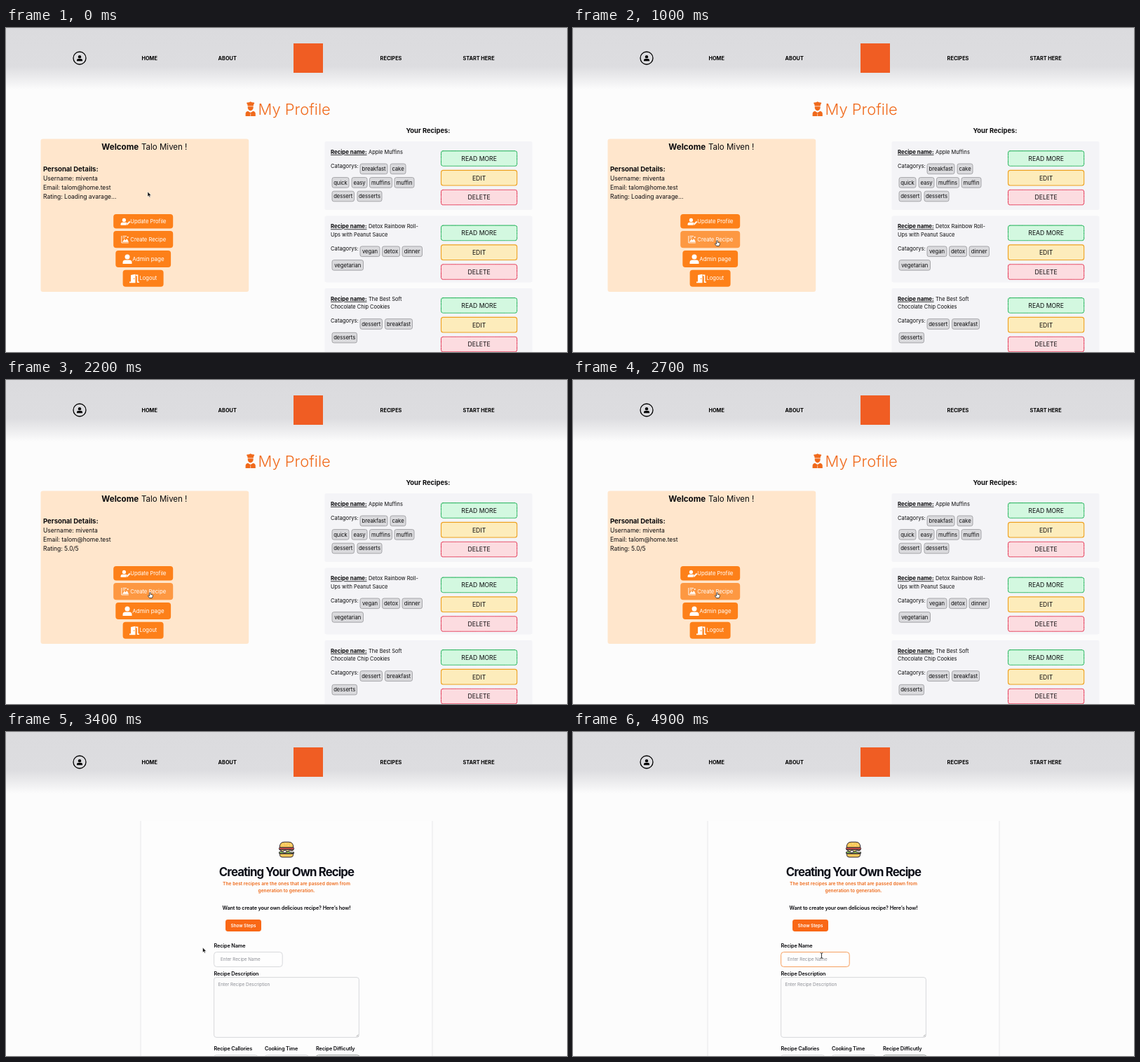
These frames come from a looping animation (800x463 px, 5000 ms). An HTML page:

```html
<!DOCTYPE html>
<html lang="en">
<head>
<meta charset="utf-8">
<title>Recipe profile</title>
<style>
  html, body { margin: 0; width: 100%; height: 100%; overflow: hidden; background: #fcfcfc; }
  svg { display: block; width: 800px; height: 463px; }
  text { font-family: Inter, "Open Sans", sans-serif; white-space: pre; }
</style>
</head>
<body>
<svg id="stage" viewBox="0 0 800 463" xmlns="http://www.w3.org/2000/svg"></svg>
<script>
const LOOP = 5000, STEP = 100;
const ORANGE = '#fd8019', HOVER = '#fd9842';

// Drawing helpers
const text = (x, y, s, size, o = {}) =>
  `<text x="${x}" y="${y}" font-size="${size}" font-weight="${o.w || 400}" fill="${o.fill || '#0b0b0d'}"` +
  ` text-anchor="${o.at || 'start'}" letter-spacing="${o.ls || 0}"${o.id ? ` id="${o.id}"` : ''}` +
  `${o.line ? ' text-decoration="underline"' : ''}>${s}</text>`;
const mid = (x, y, s, size, o = {}) => text(x, y, s, size, { ...o, at: 'middle' });
const box = (x, y, w, h, r, fill, extra = '') =>
  `<rect x="${x}" y="${y}" width="${w}" height="${h}" rx="${r}" fill="${fill}" ${extra}/>`;
const path = (d, fill, extra = '') => `<path d="${d}" fill="${fill}" ${extra}/>`;
const dot = (x, y, r, fill, extra = '') => `<circle cx="${x}" cy="${y}" r="${r}" fill="${fill}" ${extra}/>`;
const person = (x, y, k, fill) => `<g transform="translate(${x} ${y}) scale(${k})">` +
  dot(0, -3, 3.5, fill) + path('M-6.5 7V5Q-6.5 1.5-3 1.5H3Q6.5 1.5 6.5 5V7Z', fill) + '</g>';

function header() {
  const nav = [[204.7, 'HOME'], [315.7, 'ABOUT'], [549, 'RECIPES'], [674, 'START HERE']];
  return box(0, 0, 800, 88, 0, 'url(#fade)') +
    dot(105, 43, 9, 'none', 'stroke="#000" stroke-width="1.3"') + person(105, 43, .62, '#000') +
    nav.map(([x, s]) => mid(x, 45.7, s, 7.35, { w: 700, fill: '#000' })).join('') +
    box(410, 22, 42, 42, 0, '#f05d23');
}

function chef() {
  const c = '#f06a1c';
  return path('M344.7 111.4L344.2 109Q342.4 107.8 343.6 106.6Q346.2 106.8 348.7 105.2Q351.2 106.8 353.8 106.6Q355 107.8 353.2 109L352.7 111.4Z', c) +
    path('M344.8 112.2H352.6V114.2Q352 117.8 348.7 118.2Q345.4 117.8 344.8 114.2Z', c) +
    path('M341.6 126V122.4Q341.8 119.6 345 118.8L348.7 121L352.4 118.8Q355.6 119.6 355.8 122.4V126Z', c) +
    path('M348.7 122V126', 'none', 'stroke="#fcfcfc" stroke-width=".6"');
}

// Recipe cards
const actions = [
  ['READ MORE', '#d3f8e0', '#1cb054', '1.7 .4'], ['EDIT', '#fdecbb', '#eea11f', 'none'],
  ['DELETE', '#fcdce0', '#e32d4c', '1.7 .4']
];
const cards = [
  { y: 162, h: 98, top: 176, lines: ['Apple Muffins'], base: 199.7, tagY: 194,
    tags: [[505, 39, 0, 'breakfast'], [548, 22, 0, 'cake'], [465, 24, 1, 'quick'], [493, 22, 1, 'easy'],
           [518.5, 32, 1, 'muffins'], [554, 28, 1, 'muffin'], [465, 31.5, 2, 'dessert'], [501, 35, 2, 'desserts']] },
  { y: 268.5, h: 95, top: 282.5, lines: ['Detox Rainbow Roll-', 'Ups with Peanut Sauce'], base: 317.7, tagY: 312,
    tags: [[505, 28, 0, 'vegan'], [536.5, 25, 0, 'detox'], [565, 28.5, 0, 'dinner'], [465, 44.5, 1, 'vegetarian']] },
  { y: 372, h: 95, top: 386, lines: ['The Best Soft', 'Chocolate Chip Cookies'], base: 421.4, tagY: 415.7,
    tags: [[505, 31.5, 0, 'dessert'], [540.5, 39, 0, 'breakfast'], [465, 35.5, 1, 'desserts']] }
];

function card(c) {
  const tag = ([x, w, row, s]) => {
    const y = c.tagY + row * 19.6;
    return box(x, y, w, 14.6, 2.6, '#dadadd', 'stroke="#96969a" stroke-width=".8"') +
      mid(x + w / 2, y + 10, s, 7.65);
  };
  const action = ([s, fill, edge, dash], i) => {
    const y = c.top + i * 27.8;
    return box(620.5, y - .4, 108.2, 21.6, 3, fill, `stroke="${edge}" stroke-width="1.1" stroke-dasharray="${dash}"`) +
      mid(674.6, y + 13.7, s, 8.65);
  };
  return box(454.5, c.y, 296, c.h, 2, '#f4f4f7') +
    text(463, c.top + 3.9, 'Recipe name:', 7.8, { w: 700, line: true }) +
    text(517, c.top + 3.9, c.lines[0], 7.45) +
    (c.lines[1] ? text(463, c.top + 15, c.lines[1], 7.45) : '') +
    text(463, c.base, 'Catagorys:', 7.7) +
    c.tags.map(tag).join('') + actions.map(action).join('');
}

function button(id, x, y, w, h, tx, s, size) {
  return box(x, y, w, h, 4, ORANGE, `id="${id}"`) + text(tx, y + h / 2 + 2.5, s, size, { fill: '#fff' });
}

function profile() {
  const white = '#fff';
  return chef() + text(359.5, 124, 'My Profile', 22, { w: 300, fill: '#f06a1c' }) +
    box(49.5, 158.5, 296.7, 218.5, 3, '#ffe6cc') +
    text(136.3, 173.7, 'Welcome', 11.6, { w: 700 }) + text(193, 173.7, 'Talo Miven !', 11.5) +
    text(53, 205.3, 'Personal Details:', 9.55, { w: 700 }) +
    text(53, 218, 'Username: miventa', 8.5) +
    text(53, 231, 'Email: talom@home.test', 8.5) +
    text(53, 244, '', 8.5, { id: 'rating' }) +
    button('update', 153.2, 266, 85, 20.5, 177.3, 'Update Profile', 7.6) +
    person(168.4, 276.6, .74, white) +
    path('M171.6 281.8L172 279.6L176 275.6L177.6 277.2L173.6 281.2Z', white, `stroke="${ORANGE}" stroke-width=".5"`) +
    button('create', 153.2, 290, 85, 24.2, 177.3, 'Create Recipe', 7.65) +
    path('M164.8 297V307H174.8M166.5 297.5H172M166.5 299.8H170', 'none', 'stroke="#fff" stroke-width=".9"') +
    path('M166 305.8L168.8 301.5L170.6 303.5L172.4 301L175 305.8Z', white) + dot(173.7, 299, 1, white) +
    button('admin', 156.3, 318, 78.8, 24, 180.3, 'Admin page', 8) + person(173, 330, 1, white) +
    button('logout', 166.6, 345.8, 58, 24, 190.6, 'Logout', 7.5) +
    path('M178 353L184.5 351.8V364.2H176V362.6H178Z', white) + dot(182.6, 358.2, .8, ORANGE) +
    path('M185 353.4H187.6V363.3H190', 'none', 'stroke="#fff" stroke-width="1.6"') +
    mid(602, 150, 'Your Recipes:', 9.4, { w: 700 }) + cards.map(card).join('');
}

function burger() {
  const edge = 'stroke="#2b2430" stroke-width="1"';
  return '<g id="burger">' +
    path('M390.2 165.2Q390 157.2 397 157.2H403Q410 157.2 409.8 165.2Z', '#fbc95b', edge) +
    box(389.4, 165.2, 21.2, 2.8, 1.3, '#e8554e', edge) +
    path('M389.8 168.2H410.2L408 170.2L405 168.8L401.5 171.3L398 168.8L394.5 170.8Z', '#ffe17a', edge) +
    path('M389.6 171.6Q392 169.8 394.7 171.6T400 171.6T405.3 171.6T410.4 171.6V173.6H389.6Z', '#8ecb5b', edge) +
    path('M390.4 174H409.6V175.6Q409.4 178.9 406 178.9H394Q390.6 178.9 390.4 175.6Z', '#fbc95b', edge) +
    [[395, 161.5], [399, 159.8], [402.5, 162], [406, 160.8]].map(([x, y]) => dot(x, y, .6, '#fff3cf')).join('') +
    '</g>';
}

function form() {
  const label = { w: 600, ls: -.146, fill: '#08080c' }, hint = { fill: '#8b8d94' };
  const line = 'stroke="#d4d5d9" stroke-width=".9"';
  return box(192.5, 127, 415, 340, 0, '#fdfdfd') +
    [192, 608].map(x => box(x - 1, 127, 2, 340, 0, '#f2f2f3')).join('') +
    burger() +
    mid(400, 205.6, 'Creating Your Own Recipe', 16.8, { w: 700, ls: -.9, fill: '#0d0f18' }) +
    mid(400, 219.2, 'The best recipes are the ones that are passed down from', 6.63, { w: 600, fill: '#ee6a1a' }) +
    mid(400, 228.6, 'generation to generation.', 6.63, { w: 600, fill: '#ee6a1a' }) +
    mid(400, 254, 'Want to create your own delicious recipe? Here’s how!', 7.3, label) +
    box(313, 268, 51, 17, 3.4, '#f96816') + mid(338.5, 278.7, 'Show Steps', 6.3, { w: 600, fill: '#fff' }) +
    text(296.5, 307.6, 'Recipe Name', 7.3, label) +
    box(296.6, 314.5, 97.6, 21, 4, '#fefefe', 'id="field" stroke="#d4d5d9" stroke-width=".9"') +
    text(306, 327.3, 'Enter Recipe Name', 6.28, hint) +
    text(296.5, 347.6, 'Recipe Description', 7.3, label) +
    box(296.6, 350.6, 206.8, 85.8, 3.4, '#fcfcfc', line) +
    text(302.5, 363.4, 'Enter Recipe Description', 6.34, hint) +
    path('M499.6 435.2L502.4 432.4M501.4 435.4L502.6 434.2', 'none', 'stroke="#777" stroke-width=".6"') +
    [[296.5, 'Recipe Callories'], [369, 'Cooking Time'], [442, 'Recipe Difficutly']]
      .map(([x, s], i) => text(x, 455.2, s, 7.3, label) +
        box(x + .2, 461.6, 62, 20, 3.4, '#fefefe', i < 2 ? line : 'stroke="#8d9490" stroke-width=".9"')).join('');
}

// Cursor shapes, hot spot at 0,0
const cursors = {
  arrow: path('M0 0V7L1.6 5.6L2.6 8L3.8 7.5L2.8 5.2H5Z', '#111', 'stroke="#fff" stroke-width=".5"'),
  hand: path('M-.9 .6Q0-.6 .8 .6V3Q1.8 2.4 2.3 3.2Q3.4 2.8 3.7 3.8Q4.3 4.6 3.6 6.2L2.9 8H-.9L-3.2 4.9Q-3 3.6-.9 5Z',
    '#fff', 'stroke="#222" stroke-width=".8" stroke-linejoin="round"'),
  beam: path('M-1.8-3.8Q0-3.8 0-2.6Q0-3.8 1.8-3.8M0-2.8V2.8M-1.8 3.8Q0 3.8 0 2.6Q0 3.8 1.8 3.8', 'none',
    'stroke="#222" stroke-width=".9"')
};

document.getElementById('stage').innerHTML =
  `<defs><linearGradient id="fade" x1="0" y1="0" x2="0" y2="1">
    <stop offset="0" stop-color="#dbdbde"/><stop offset=".62" stop-color="#dddde0"/>
    <stop offset=".8" stop-color="#ebebed"/><stop offset="1" stop-color="#fcfcfc"/>
  </linearGradient></defs>` +
  box(0, 0, 800, 463, 0, '#fcfcfc') + header() +
  `<g id="profile">${profile()}</g><g id="form">${form()}</g>` +
  '<g id="cursor">' + Object.entries(cursors).map(([k, d]) => `<g id="${k}">${d}</g>`).join('') + '</g>';

// Time, x, y of the pointer
const track = [
  [0, 202, 234], [200, 202, 234], [800, 205.5, 303.5], [3100, 205.5, 303.5],
  [3700, 355.5, 312.5], [4000, 355.5, 312.5], [4300, 354.5, 319.5], [LOOP, 354.5, 319.5]
];
const $ = id => document.getElementById(id);
const show = (id, on) => $(id).setAttribute('visibility', on ? 'inherit' : 'hidden');
const within = (v, a, b) => v >= a && v <= b;

function pointer(t) {
  const i = track.findIndex(k => k[0] > t);
  const [t0, x0, y0] = track[i - 1], [t1, x1, y1] = track[i];
  const p = (t - t0) / (t1 - t0), e = p * p * (3 - 2 * p);
  return [x0 + (x1 - x0) * e, y0 + (y1 - y0) * e];
}

function render(t) {
  const [x, y] = pointer(t), onForm = t >= 2800;
  const overUpdate = !onForm && within(y, 266, 286.5);
  const overCreate = !onForm && within(y, 290, 314);
  const overField = onForm && x > 297 && y > 314.5;
  const shape = overField ? 'beam' : overUpdate || overCreate || (onForm && t <= 3100) ? 'hand' : 'arrow';

  $('profile').style.display = onForm ? 'none' : '';
  $('form').style.display = onForm ? '' : 'none';
  $('rating').textContent = t < 1300 ? 'Rating: Loading avarage...' : 'Rating: 5.0/5';
  $('update').setAttribute('fill', overUpdate ? HOVER : ORANGE);
  $('create').setAttribute('fill', overCreate ? HOVER : ORANGE);
  show('burger', t >= 3100);
  $('field').setAttribute('stroke', t >= 4500 ? '#f5964f' : '#d4d5d9');
  $('cursor').setAttribute('transform', `translate(${x} ${y})`);
  Object.keys(cursors).forEach(k => show(k, k === shape));
}

const start = performance.now();
function tick() {
  const t = Math.max(0, performance.now() - start) % LOOP;
  render(Math.floor(t / STEP) * STEP);
  requestAnimationFrame(tick);
}
tick();
</script>
</body>
</html>
```
